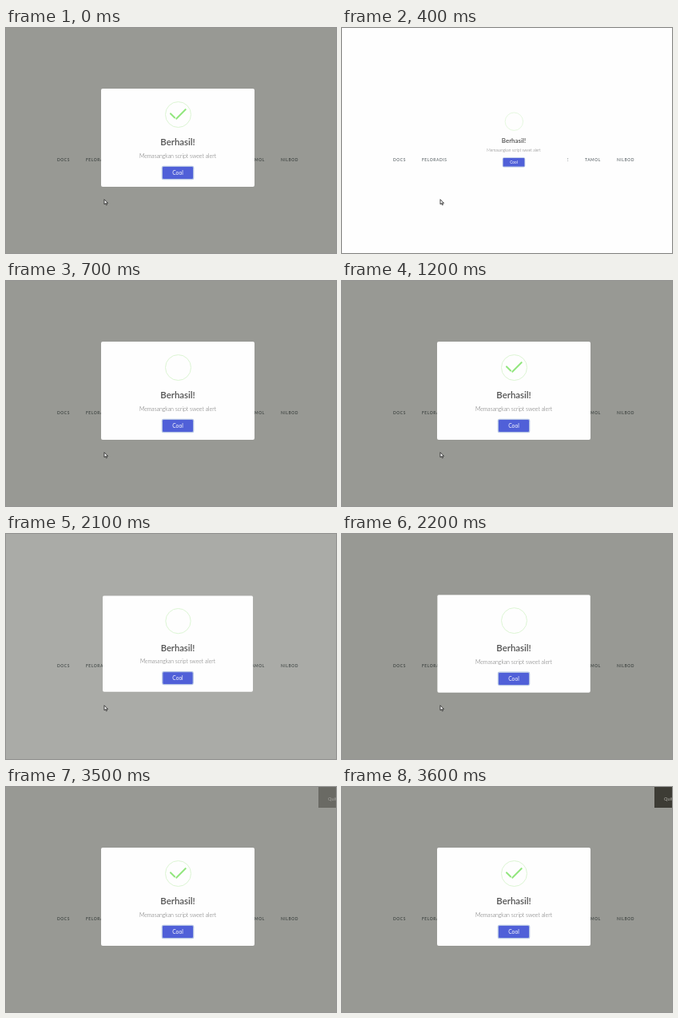
An HTML page for the animation above (4.3 s loop, 413 px wide and 282 px high).

```html
<!DOCTYPE html>
<html lang="id">
<head>
<meta charset="utf-8">
<title>Alert</title>
<style>
html, body { margin: 0; width: 100%; height: 100%; overflow: hidden; background: #fefefe; }
body { position: relative; font-family: Lato, "Open Sans", sans-serif; line-height: 12px; }
body *, .ring::before { position: absolute; box-sizing: border-box; white-space: nowrap; }

.link { top: 159px; color: #636b6f; font-size: 4.9px; font-weight: 600; letter-spacing: .6px; }
#shade { inset: 0; animation: shade .1s 15ms both paused; }
#popup { left: 119px; top: 76px; width: 192px; height: 123px; border-radius: 2px;
  background: #fefefe; text-align: center; animation: show .3s both paused; }
#popup > p { margin: 0; width: 100%; }
.title { top: 61px; color: #505050; font-size: 11.4px; font-weight: 600; }
.text { top: 78px; color: #6a6a6a; font-size: 6.95px; font-weight: 300; }
.button { left: 77px; top: 98px; width: 38px; height: 15.4px; line-height: 15px; border-radius: 1.2px;
  background: #5060d8; color: #fff; font-size: 6.7px; box-shadow: 0 0 0 1.3px #b4c4e4; }

/* 1em is 6px inside the icon */
.ring { left: 79.5px; top: 15.5px; width: 33px; height: 33px; font-size: 6px;
  border: 1.5px solid #dcf5d3; border-radius: 50%; }
.ring i { height: .3125em; border-radius: .125em; background: #92e67e; }
.tip { transform: rotate(45deg); animation: tip .75s both paused; }
.long { transform: rotate(-45deg); animation: long .75s both paused; }

#cursor { left: 0; top: 0; width: 7px; height: 10px; overflow: visible; }
#quit { right: 0; top: 0; width: 22px; height: 26px; overflow: hidden; background: #3d3c35; }
#quit span { left: 12px; top: 9px; color: #b0afa9; font-size: 5.6px; }

@keyframes shade { from { background: rgba(11,13,0,0); } to { background: rgba(11,13,0,.42); } }
@keyframes show {
  0% { transform: scale(.7); }
  45% { transform: scale(1.05); }
  80% { transform: scale(.95); }
  100% { transform: scale(1); }
}
@keyframes tip {
  0% { top: 1.1875em; left: .0625em; width: 0; }
  54% { top: 1.0625em; left: .125em; width: 0; }
  70% { top: 2.1875em; left: -.375em; width: 3.125em; }
  84% { top: 3em; left: 1.3125em; width: 1.0625em; }
  100% { top: 2.8125em; left: .8125em; width: 1.5625em; }
}
@keyframes long {
  0%, 65% { top: 3.375em; right: 2.875em; width: 0; }
  84% { top: 2.1875em; right: 0; width: 3.4375em; }
  100% { top: 2.375em; right: .5em; width: 2.9375em; }
}
</style>
</head>
<body>
<span class="link" style="left:64px">DOCS</span>
<span class="link" style="left:100px">FELORADIS</span>
<span class="link" style="left:263.6px">TOMBE</span>
<span class="link" style="left:304px">TAMOL</span>
<span class="link" style="left:344px">NILBOD</span>
<div id="shade"></div>
<div id="popup">
  <div class="ring"><i class="tip"></i><i class="long"></i></div>
  <p class="title">Berhasil!</p>
  <p class="text">Memasangkan script sweet alert</p>
  <div class="button">Cool</div>
</div>
<svg id="cursor"><path d="M.4 .4V6.6L1.9 5.3L2.9 7.6L3.9 7.1L2.9 5H4.9Z" fill="#f4f4f4" stroke="#222" stroke-width=".8"/></svg>
<div id="quit"><span>Quit</span></div>
<script>
const LOOP = 4300, STEP = 100;
const $ = id => document.getElementById(id);
const anims = document.getAnimations();

// Time since the dialog last opened
function age(t) {
  if (t < 400) return 1000;
  return t < 2100 ? t - 400 : t - 2100 + 67;
}

function draw() {
  const t = Math.floor(performance.now() % LOOP / STEP) * STEP;
  for (const a of anims) a.currentTime = age(t);

  const [x, y] = t < 2600 ? [122.6, 214.4] : [242, 182];
  $("cursor").style.transform = `translate(${x}px, ${y}px)`;
  $("cursor").style.display = t < 2700 ? "" : "none";
  $("quit").style.opacity = t < 3500 ? 0 : t < 3600 ? .5 : 1;
  requestAnimationFrame(draw);
}
draw();
</script>
</body>
</html>
```
